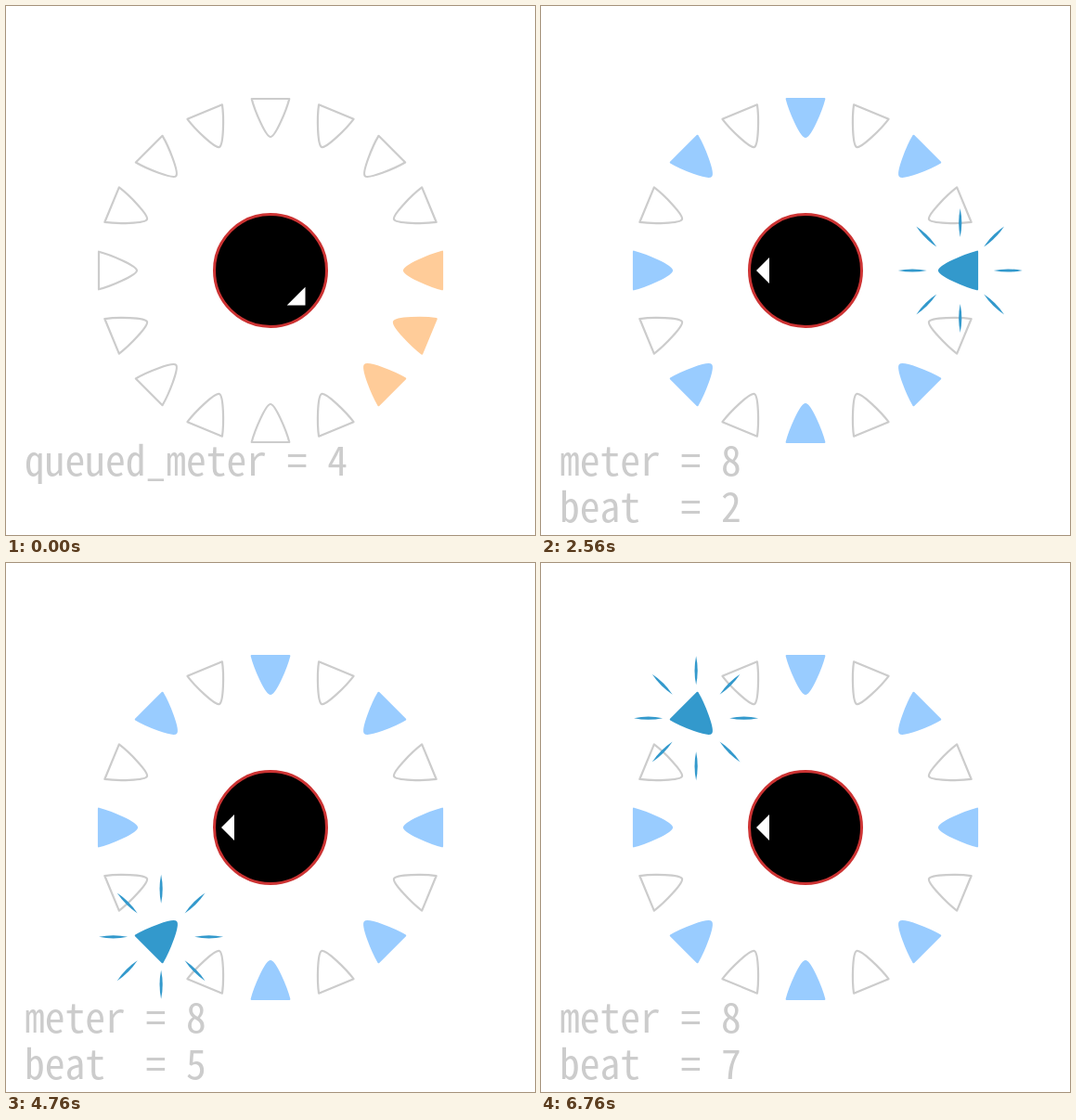
Recreate the animation shown at these times as an HTML page. Size 570 by 570 pixels, loop 6960 ms.

```html
<!DOCTYPE html>
<html lang="en">
<head>
<meta charset="utf-8">
<title>Meter dial</title>
<style>
html, body { margin: 0; width: 100%; height: 100%; overflow: hidden; background: #fff; }
svg { display: block; width: 100%; height: 100%; }
text {
  font: 43.5px "Noto Sans Mono CJK JP", "Noto Sans Mono CJK SC", "Noto Sans Mono CJK KR", monospace;
  fill: #ccc; white-space: pre;
}
.led { stroke-width: 2.2; stroke-linejoin: round; }
</style>
</head>
<body>
<svg viewBox="0 0 570 570">
  <g transform="translate(285 285)">
    <g id="leds"></g>
    <circle r="60.5" stroke="#c33" stroke-width="3"/>
    <path id="pointer" d="M53 0L39 -14V14Z" fill="#fff"/>
    <g id="burst" fill="#39c"></g>
  </g>
  <text id="line1" x="20" y="506"></text>
  <text id="line2" x="20" y="556"></text>
</svg>
<script>
const LOOP = 6960, START = 2120, FIRST_BEAT = 2160, BEAT = 200, LEDS = 16, METER = 8;
const LED = "M-20.3 -185H20.3C17 -172 5 -144 0 -144C-5 -144 -17 -172 -20.3 -185Z";
const RAY = "M36 0Q51.5 -3.2 67 0Q51.5 3.2 36 0Z";
const $ = id => document.getElementById(id);

function addPath(parent, d, angle) {
  const p = document.createElementNS("http://www.w3.org/2000/svg", "path");
  p.setAttribute("d", d);
  p.setAttribute("transform", `rotate(${angle})`);
  parent.append(p);
  return p;
}

// LED 0 is at the right, counting clockwise
const leds = Array.from({ length: LEDS }, (_, i) => {
  const led = addPath($("leds"), LED, 90 + i * 360 / LEDS);
  led.setAttribute("class", "led");
  return led;
});
for (let a = 0; a < 360; a += 45) addPath($("burst"), RAY, a);

function paint(color) {
  leds.forEach((led, i) => {
    const c = color(i);
    led.setAttribute("fill", c || "none");
    led.setAttribute("stroke", c || "#ccc");
  });
}

function draw(t) {
  const [knob, queued] = t < 240 ? [2, 4] : t < 760 ? [5, 6] : [8, METER];
  const playing = t >= FIRST_BEAT;
  const beat = playing ? Math.floor((t - FIRST_BEAT) / BEAT) % METER : 0;

  $("pointer").setAttribute("transform", `rotate(${knob * 360 / LEDS})`);
  $("line1").textContent = t < START ? `queued_meter = ${queued}` : `meter = ${METER}`;
  $("line2").textContent = t < START ? "" : `beat  = ${beat}`;

  $("burst").setAttribute("visibility", playing ? "visible" : "hidden");
  if (playing) {
    const step = LEDS / METER, lit = (beat * step + 12) % LEDS;
    const a = lit * 2 * Math.PI / LEDS;
    $("burst").setAttribute("transform", `translate(${166.7 * Math.cos(a)} ${166.7 * Math.sin(a)})`);
    paint(i => i === lit ? "#39c" : i % step === 0 && "#9cf");
  } else {
    paint(i => i <= knob && "#fc9");
  }
}

const begin = performance.now();
function tick() {
  draw((performance.now() - begin) % LOOP);
  requestAnimationFrame(tick);
}
tick();
</script>
</body>
</html>
```
